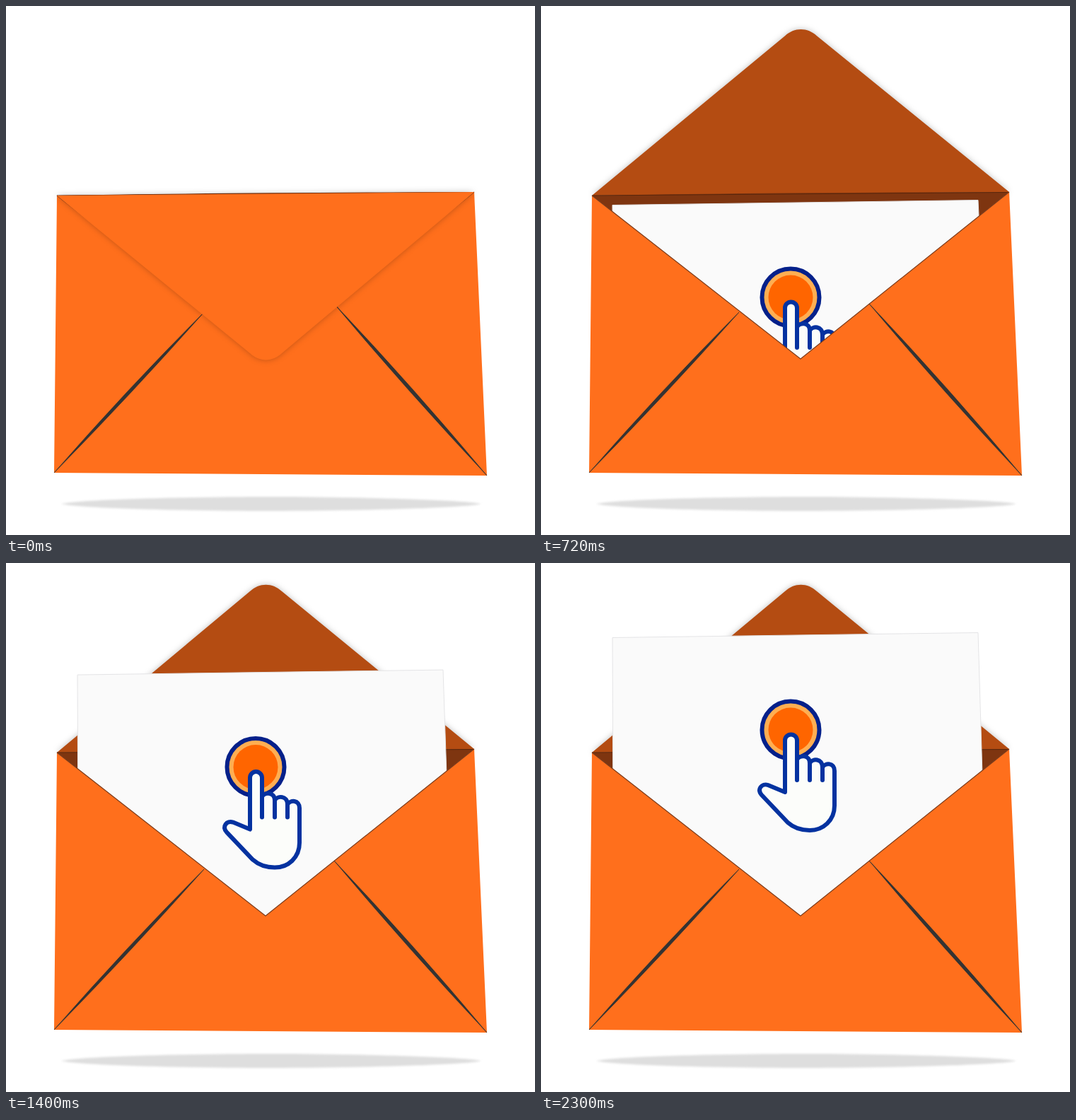
Animation, 748 px wide and 748 px high, one loop 2620 ms. Source, as an HTML page:

```html
<!DOCTYPE html>
<html lang="en">
<head>
<meta charset="utf-8">
<title>Opening envelope</title>
<style>
  html, body { margin: 0; width: 100%; height: 100%; overflow: hidden; background: #fff; }
  svg { display: block; width: 100vw; height: 100vh; }
  .flap { filter: drop-shadow(0 0 4px rgba(0, 0, 0, .25)); }
</style>
</head>
<body>
<svg viewBox="0 0 748 748">
  <defs>
    <filter id="soft" x="-5%" y="-50%" width="110%" height="200%">
      <feGaussianBlur stdDeviation="1.6"/>
    </filter>
  </defs>

  <path d="M78 704C110 697 270 694 375 694S650 698 672 704C650 710 480 714 375 714S110 711 78 704Z"
        fill="#dedede" filter="url(#soft)"/>

  <path id="backFlap" class="flap" fill="#b44c12"/>
  <path d="M72 268Q300 264 662 263L367 499Z" fill="#7e3510"/>
  <path d="M72 268L662 263.5" stroke="#5a260b"/>

  <path id="letter" fill="#fafafa" stroke="#e4e4e6"/>
  <g id="icon" stroke-width="6" stroke-linecap="round" stroke-linejoin="round">
    <circle cx="353" cy="236" r="40.5" fill="#ffae52" stroke="#04208a"/>
    <circle cx="353" cy="236" r="31.5" fill="#ff6500"/>
    <g fill="#fcfdfa" stroke="#0432a0">
      <path d="M345 324V251a8.5 8.5 0 0 1 17 0V278C366 271 380 271 380 283C384 276 398 276 398 289
               C402 282 415 282 415 294V343C415 364 399 378 380 378C368 378 358 375 349 367
               L312 328C305 320 312 311 321 314Z"/>
      <path d="M362 270V307M380 283V307M398 289V307"/>
    </g>
  </g>

  <path d="M72 268L367 499L662 263L680 664L68 660Z" fill="#ff6f1c"/>
  <path d="M72 268L367 499L662 263" fill="none" stroke="#7a3a1a" stroke-width="1.2"/>
  <path d="M68 660Q176 550 280 433Q172 541 68 660ZM680 664Q574 537 464 421Q568 545 680 664Z"
        fill="#333" stroke="#333" stroke-width=".7"/>
  <path id="frontFlap" class="flap" fill="#ff6f1c"/>
</svg>
<script>
  const LOOP = 2620;
  const [backFlap, frontFlap, letter, icon] =
    ["backFlap", "frontFlap", "letter", "icon"].map(id => document.getElementById(id));

  const progress = (t, start, length) => Math.min(1, Math.max(0, (t - start) / length));
  const easeSine = u => (1 - Math.cos(Math.PI * u)) / 2;

  // scale runs from 1 (closed, pointing down) to -1 (open, pointing up)
  function flapPath(scale) {
    const y = 265.5 + 225.5 * scale;
    const tip = y + 12.5 * scale;
    return `M72 268L345 ${y}C358 ${tip} 377 ${tip} 390 ${y}L662 263Z`;
  }

  function draw(t) {
    const scale = Math.cos(Math.PI * progress(t, 40, 713));
    const closed = scale > 0;
    frontFlap.style.display = closed ? "" : "none";
    backFlap.style.display = closed ? "none" : "";
    (closed ? frontFlap : backFlap).setAttribute("d", flapPath(scale));

    const drop = 176 * (1 - easeSine(progress(t, 785, 975)));
    letter.setAttribute("d", `M101 ${105.5 + drop}L618 ${98.5 + drop}L633 600L103 600Z`);
    icon.setAttribute("transform", `translate(0 ${drop})`);
  }

  const begin = performance.now();
  function tick() {
    draw((performance.now() - begin) % LOOP);
    requestAnimationFrame(tick);
  }
  tick();
</script>
</body>
</html>
```
